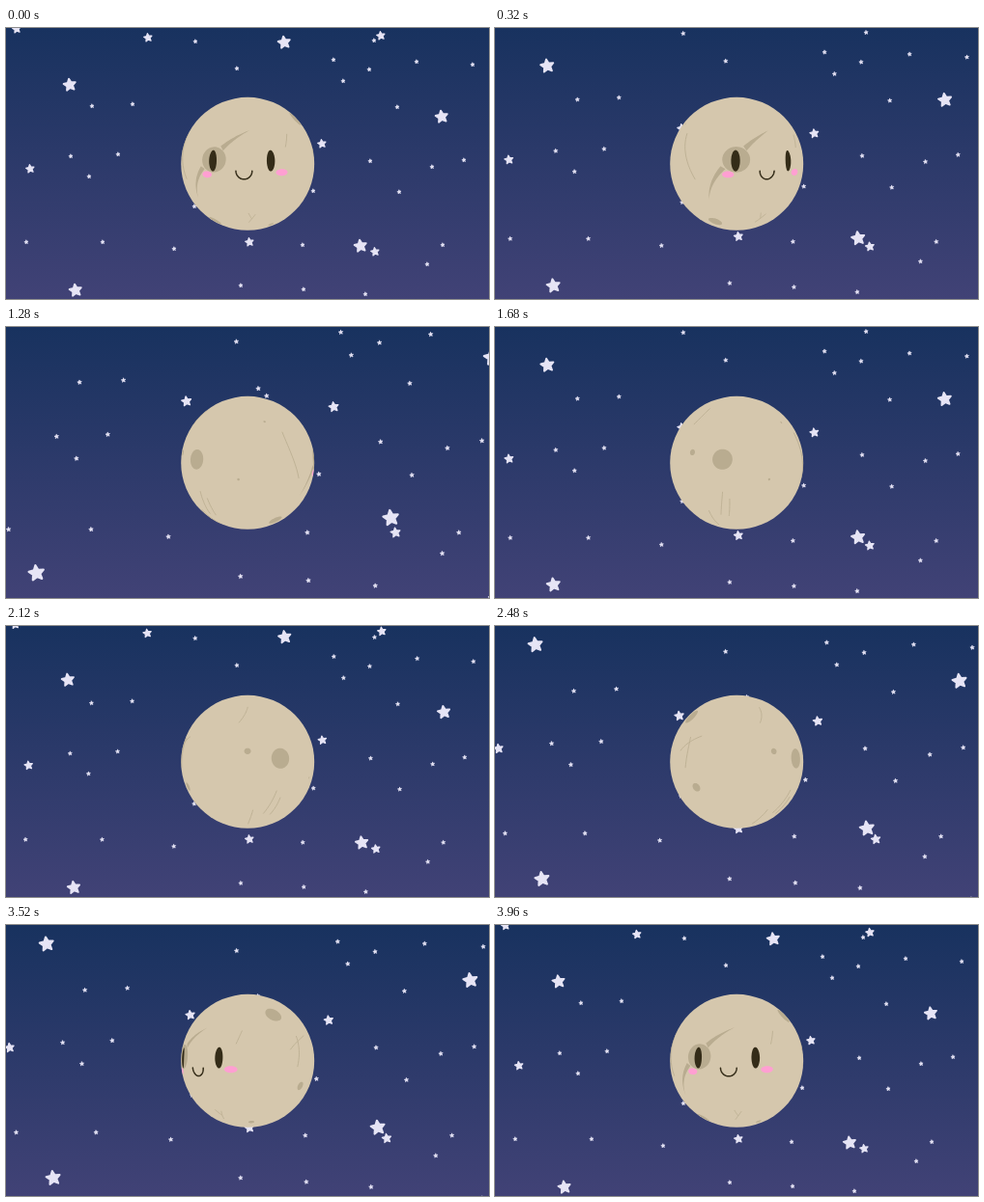
An HTML page with a canvas for the animation above (4000 ms loop, 500x281 px).

```html
<!DOCTYPE html>
<html lang="en">
<head>
<meta charset="utf-8">
<title>Spinning moon</title>
<style>
  html, body { margin: 0; width: 100%; height: 100%; overflow: hidden; background: #2b3a6a; }
  canvas { display: block; width: 100vw; height: 100vh; }
</style>
</head>
<body>
<canvas></canvas>
<script>
const W = 500, H = 281, LOOP = 4000;
const canvas = document.querySelector('canvas');
const ctx = canvas.getContext('2d');
const ratio = window.devicePixelRatio || 1;
canvas.width = W * ratio;
canvas.height = H * ratio;
ctx.scale(ratio, ratio);

const MOON = { x: 250.2, y: 140.8, r: 69, distance: 15 };
const SKIN = '#d5c7ad', SHADE = '#b9ac90', INK = '#342c18', BLUSH = '#ff9fd2';

// Each layer zooms around its own centre; near stars are bigger and zoom more.
const layers = [
  { zoom: 0.1, cx: 246, cy: 370, r: 2.5, stars: [
    [196, 14], [239, 42], [89, 81], [131, 79], [67, 133], [116, 131], [86, 154],
    [21, 222], [100, 222], [174, 229], [243, 267], [308, 271], [372, 276], [436, 245],
    [452, 225], [307, 225], [318, 169], [407, 170], [441, 144], [474, 137], [377, 138],
    [405, 82], [349, 55], [376, 43], [339, 33], [381, 13], [425, 35], [483, 38],
    [195, 185], [260, 87], [268, 94], [482, 287]] },
  { zoom: 0.2, cx: 252, cy: 347, r: 5, stars: [
    [11, 1], [147, 10], [388, 8], [327, 120], [25, 146], [252, 222], [382, 232], [196, 115]] },
  { zoom: 0.298, cx: 238, cy: 341, r: 7.4, stars: [
    [66, 59], [288, 15], [451, 92], [367, 226], [72, 272]] }
];

// Positions on the moon are [longitude, latitude] in degrees, latitude pointing down.
const craters = [
  [-29.3, -3.5, 11.3, 10.4], [73, -42, 7.2, 7.2], [-65, 58, 6, 6], [-163, -2.8, 8.3, 8.3],
  [169, -8.6, 2.7, 2.5], [98.3, 21.5, 4, 3.7], [50, 63.5, 2.5, 2.5],
  [-123, 13.6, 1, 1], [-98, -36, 1, 1]
];
const streaks = [
  [[-22, -12.5], [-11.5, -21], [2, -28.5]],
  [[-40, 3], [-50, 16], [-56, 30.5]]
];
const scratches = [
  [[-82, -26], [-77, -8.6], [-66.4, 12.7]],
  [[91.6, -20.7], [91.5, -9], [89, 4.7]],
  [[81.4, -9.4], [91, -16], [104.2, -21.5]],
  [[38, -25], [36, -20], [33.5, -14]],
  [[1, 45.5], [3, 49], [5, 52]],
  [[9, 47], [6, 52], [2, 58]],
  [[169, -52], [166, -43], [160.6, -34]],
  [[-171, 48], [-167, 37], [-164, 24.5]],
  [[-161, 49.5], [-159, 41], [-158, 31]],
  [[175, 44], [173, 54], [170, 65]]
];

const rad = degrees => degrees * Math.PI / 180;
const sample = (n, fn) => Array.from({ length: n + 1 }, (_, i) => fn(i / n));

let spin = 0;

// Perspective view of a point on the turning sphere; hidden points land on the rim.
function project([lon, lat]) {
  const a = rad(lon + spin), b = rad(lat), d = MOON.distance;
  const x = Math.sin(a) * Math.cos(b), y = Math.sin(b), z = Math.cos(a) * Math.cos(b);
  const visible = z > 1 / d;
  const k = MOON.r * (visible ? Math.sqrt(d * d - 1) / (d - z) : 1 / Math.hypot(x, y));
  return { x: MOON.x + x * k, y: MOON.y + y * k, visible };
}

function fillShape(points, color) {
  const shape = points.map(project);
  if (!shape.some(p => p.visible)) return;
  ctx.beginPath();
  shape.forEach(p => ctx.lineTo(p.x, p.y));
  ctx.fillStyle = color;
  ctx.fill();
}

function strokePath(points, color, width) {
  ctx.beginPath();
  let drawing = false;
  for (const p of points.map(project)) {
    if (p.visible) drawing ? ctx.lineTo(p.x, p.y) : ctx.moveTo(p.x, p.y);
    drawing = p.visible;
  }
  ctx.strokeStyle = color;
  ctx.lineWidth = width;
  ctx.stroke();
}

function spot([lon, lat, rx, ry], color) {
  fillShape(sample(48, u => {
    const a = u * 2 * Math.PI, y = lat + ry * Math.sin(a);
    return [lon + rx * Math.cos(a) / Math.cos(rad(lat)), y];
  }), color);
}

// Quadratic curve through three points
function through([p, q, r]) {
  return u => [0, 1].map(i =>
    p[i] * (1 - u) * (1 - 2 * u) + q[i] * 4 * u * (1 - u) + r[i] * u * (2 * u - 1));
}

function streak(points) {
  const at = through(points);
  const [start, , end] = points;
  const dx = end[0] - start[0], dy = end[1] - start[1], length = Math.hypot(dx, dy);
  const side = sign => u => {
    const [x, y] = at(u), w = sign * 2.3 * (1 - u);
    return [x - dy / length * w, y + dx / length * w];
  };
  fillShape([...sample(16, side(1)), ...sample(16, side(-1)).reverse()], SHADE);
}

function drawMoon() {
  ctx.save();
  ctx.beginPath();
  ctx.arc(MOON.x, MOON.y, MOON.r, 0, 2 * Math.PI);
  ctx.fillStyle = SKIN;
  ctx.fill();
  ctx.clip();
  streaks.forEach(streak);
  craters.forEach(c => spot(c, SHADE));
  scratches.forEach(s => strokePath(sample(12, through(s)), SHADE, 0.8));
  spot([-36, 8.7, 4.8, 2.7], BLUSH);
  spot([29.2, 7, 5.5, 2.8], BLUSH);
  spot([-29.8, -2.5, 3.6, 8.6], INK);
  spot([19, -2.5, 3.5, 8.6], INK);
  strokePath(sample(24, u => [
    -3.1 + 6.6 * Math.cos(u * Math.PI), 5.8 + 6.8 * Math.sin(u * Math.PI)
  ]), INK, 1.5);
  ctx.restore();
}

function drawStar(x, y, r, tilt) {
  ctx.beginPath();
  for (let i = 0; i < 10; i++) {
    const a = tilt + i * Math.PI / 5 - Math.PI / 2;
    const d = r * (i % 2 ? 0.42 : 0.88);
    ctx.lineTo(x + d * Math.cos(a), y + d * Math.sin(a));
  }
  ctx.closePath();
  ctx.lineWidth = r * 0.24;
  ctx.fill();
  ctx.stroke();
}

function drawSky(swell) {
  const sky = ctx.createLinearGradient(0, 0, 0, H);
  sky.addColorStop(0, '#18325f');
  sky.addColorStop(1, '#414276');
  ctx.fillStyle = sky;
  ctx.fillRect(0, 0, W, H);
  ctx.fillStyle = ctx.strokeStyle = '#e6e4f5';
  for (const { zoom, cx, cy, r, stars } of layers) {
    const s = 1 + zoom * swell;
    for (const [x, y] of stars) {
      drawStar(cx + (x - cx) * s, cy + (y - cy) * s, r * s, -0.15);
    }
  }
}

function frame(now) {
  const t = now % LOOP / LOOP;
  spin = 360 * t;
  drawSky((1 - Math.cos(4 * Math.PI * t)) / 2);
  drawMoon();
  requestAnimationFrame(frame);
}

ctx.lineJoin = ctx.lineCap = 'round';
requestAnimationFrame(frame);
</script>
</body>
</html>
```
